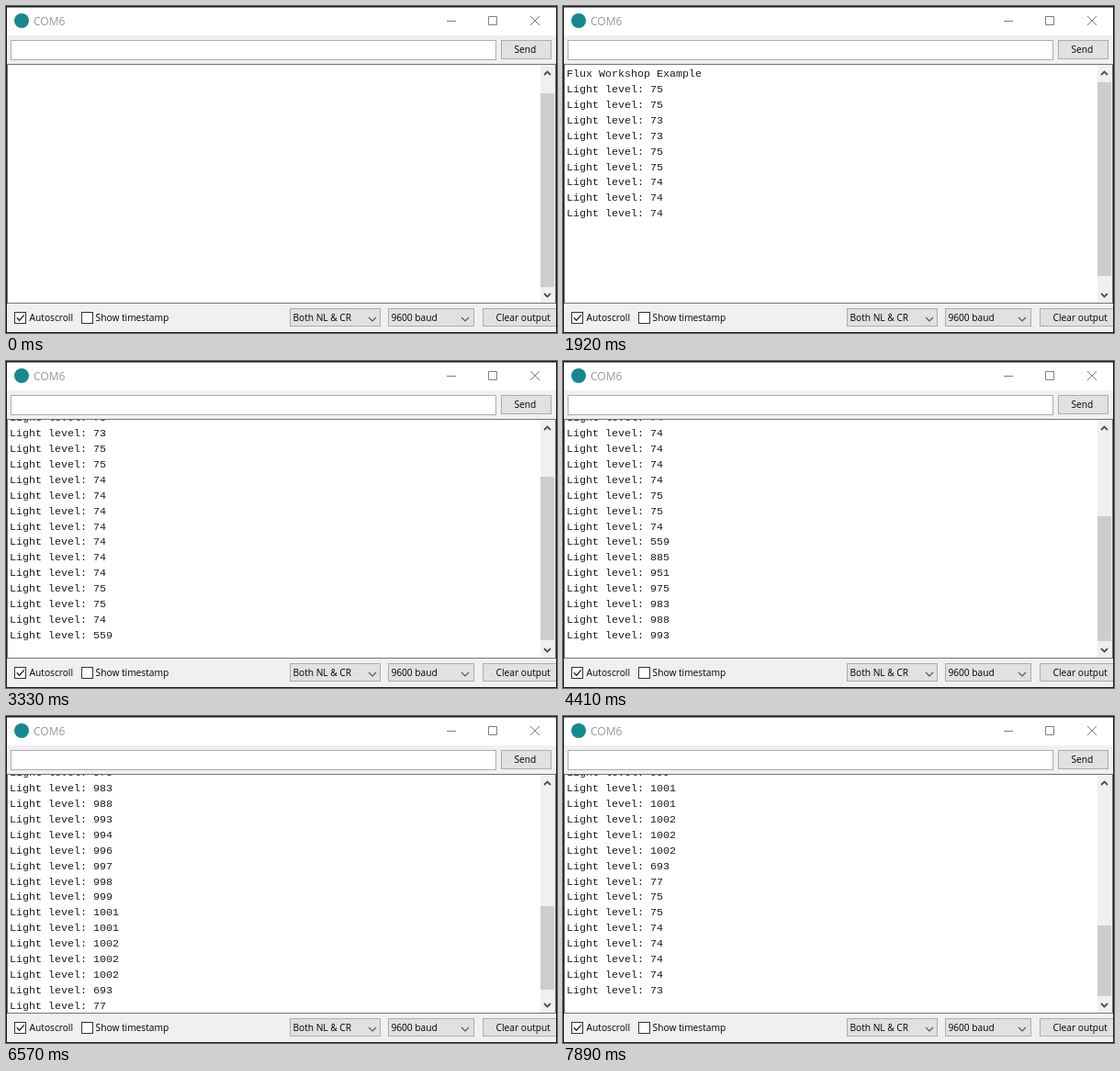
Recreate the animation shown at these times as an HTML page. Size 600 by 356 pixels, loop 8000 ms.

```html
<!DOCTYPE html>
<html lang="en">
<head>
<meta charset="utf-8">
<title>Serial monitor</title>
<style>
  html, body { margin: 0; width: 100%; height: 100%; overflow: hidden; background: #f0f0f0; }
  svg { display: block; width: 600px; height: 356px; }
  text { font: 10.2px "Open Sans", "Noto Sans", sans-serif; fill: #000; white-space: pre; }
  .title { font-size: 12px; fill: #999; }
  #log text { font: 11.67px "Liberation Mono", monospace; fill: #1c1c1c; }
  .button { fill: #e1e1e1; stroke: #adadad; }
  .box { fill: #fff; stroke: #333; }
  .line { fill: none; stroke: #808080; }
  .arrow { fill: none; stroke: #505050; stroke-width: 1.8; }
  .chevron { fill: none; stroke: #555; stroke-width: 1.1; }
</style>
</head>
<body>
<svg viewBox="0 0 600 356">
  <clipPath id="view"><rect x="2" y="64" width="580" height="259"/></clipPath>
  <rect width="600" height="356" fill="#f0f0f0"/>

  <!-- title bar -->
  <rect width="600" height="32" fill="#fff"/>
  <circle cx="17" cy="16" r="8" fill="#16898f"/>
  <text class="title" x="30" y="20.5">COM6</text>
  <path class="line" d="M480 16.5h10M525.5 11.5h9v9h-9zM571 11l10 10M581 11l-10 10"/>

  <!-- input row -->
  <rect x="5.5" y="37.5" width="528" height="21" fill="#fff" stroke="#abadb3"/>
  <rect class="button" x="539.5" y="37.5" width="54" height="20"/>
  <text x="553.5" y="51">Send</text>

  <!-- output area -->
  <rect x="1.5" y="63.5" width="597" height="260" fill="#fff" stroke="#70747a"/>
  <g clip-path="url(#view)"><g id="log"></g></g>
  <rect x="582" y="64" width="16" height="259" fill="#f0f0f0"/>
  <rect id="thumb" x="582" width="15" fill="#cdcdcd"/>
  <path class="arrow" d="M586 75l3.5-3.5 3.5 3.5M586 313l3.5 3.5 3.5-3.5"/>

  <!-- bottom row -->
  <rect class="box" x="9.5" y="333.5" width="12" height="12"/>
  <path d="M11.8 339.3l2.8 2.9 5.2-5.8" fill="none" stroke="#222" stroke-width="1.3"/>
  <text x="25.6" y="343">Autoscroll</text>
  <rect class="box" x="82.5" y="333.5" width="12" height="12"/>
  <text x="97.6" y="343">Show timestamp</text>
  <rect class="button" x="309.5" y="329.5" width="98" height="19"/>
  <text x="312.4" y="343">Both NL &amp; CR</text>
  <path class="chevron" d="M395 339l4 4 4-4"/>
  <rect class="button" x="416.5" y="329.5" width="93" height="19"/>
  <text x="419.4" y="343">9600 baud</text>
  <path class="chevron" d="M496 339l4 4 4-4"/>
  <rect class="button" x="519.5" y="329.5" width="82" height="19"/>
  <text x="533.6" y="343">Clear output</text>

  <!-- window edge -->
  <path d="M0 0h600v356H0zM1 1.6V355h598V1.6z" fill="#1c1c1c" fill-rule="evenodd"/>
</svg>
<script>
const LOOP = 8000, PITCH = 16.91, FIRST_BASELINE = 77.08, VIEW = 259;
const TRACK_TOP = 83.6, TRACK = 222, MIN_CONTENT = 272;
const levels = [75, 75, 73, 73, 75, 75, 74, 74, 74, 74, 74, 74, 74, 75, 75, 74,
  559, 885, 951, 975, 983, 988, 993, 994, 996, 997, 998, 999, 1001, 1001,
  1002, 1002, 1002, 693, 77, 75, 75, 74, 74, 74, 74, 73];

// Arrival times of every sixth reading; the ones between are evenly spaced.
const marks = [420, 1530, 2580, 3660, 4740, 5850, 6930, 8010];
function arrival(row) {
  if (row === 0) return 390;
  const k = Math.floor((row - 1) / 6), step = (row - 1) % 6;
  return marks[k] + (marks[k + 1] - marks[k]) * step / 6;
}

const log = document.getElementById("log");
const thumb = document.getElementById("thumb");
const rows = ["Flux Workshop Example", ...levels.map(v => "Light level: " + v)].map((label, i) => {
  const el = document.createElementNS("http://www.w3.org/2000/svg", "text");
  el.setAttribute("x", 4);
  el.setAttribute("y", FIRST_BASELINE + i * PITCH);
  el.textContent = label;
  log.append(el);
  const time = arrival(i), odd = i % 2;
  // The new line lengthens the page first, then the view follows it.
  return { el, time, grow: time + (odd ? 0 : 34), scroll: time + (odd ? 29.9 : 34) };
});

function draw(t) {
  const passed = key => rows.filter(r => r[key] <= t).length;
  for (const r of rows) r.el.style.display = r.time <= t ? "" : "none";

  const content = Math.max(MIN_CONTENT, (passed("grow") + 1) * PITCH);
  const offset = t < rows[0].time
    ? MIN_CONTENT - VIEW + 1.5
    : Math.max(0, passed("scroll") * PITCH - 241.74);
  log.setAttribute("transform", `translate(0 ${-offset})`);
  thumb.setAttribute("y", Math.floor(TRACK_TOP + TRACK * offset / content));
  thumb.setAttribute("height", Math.floor(TRACK * VIEW / content));
}

function frame() {
  draw(performance.now() % LOOP);
  requestAnimationFrame(frame);
}
frame();
</script>
</body>
</html>
```
